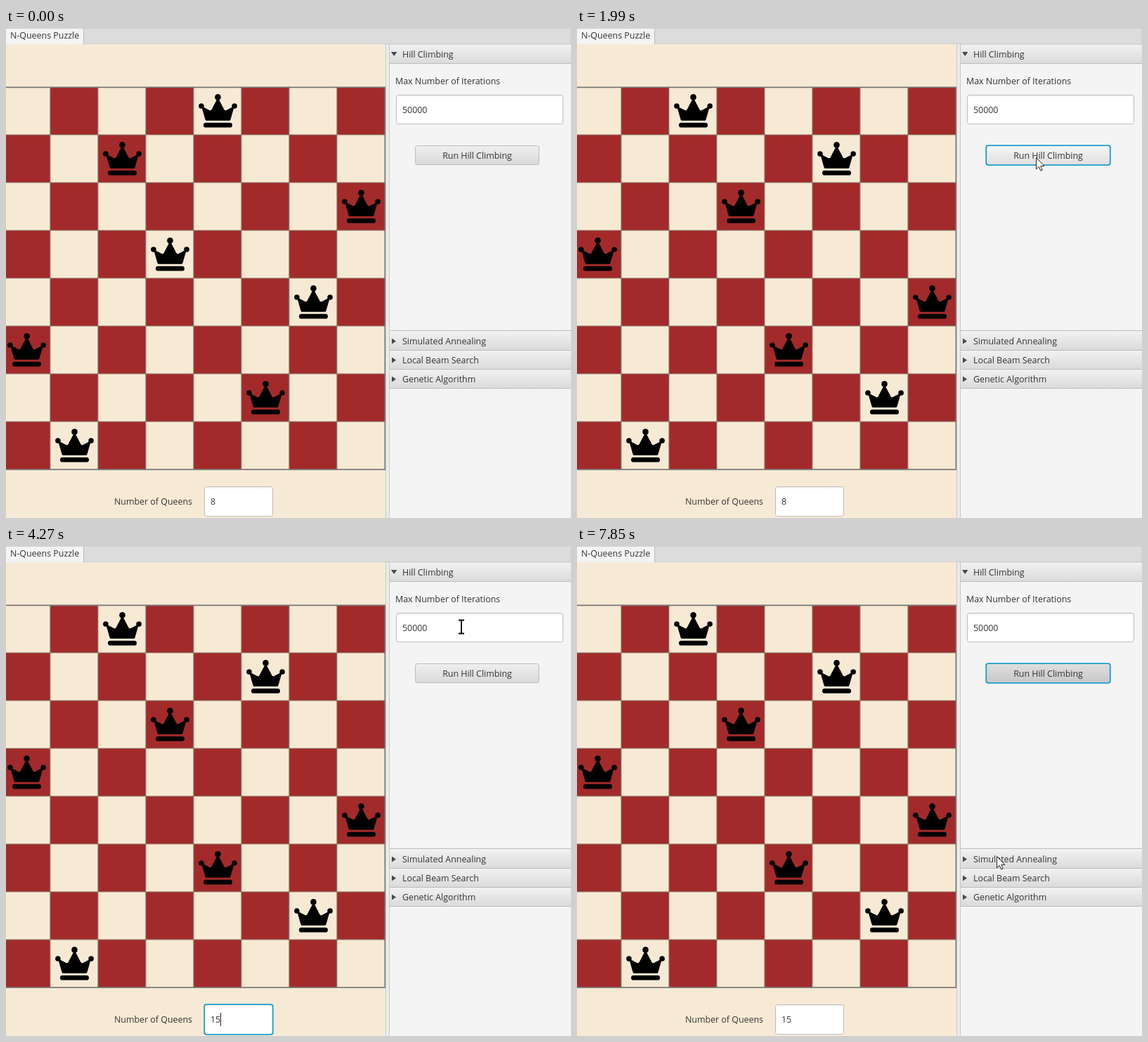
Write an HTML page that moves like this. It is 804 px wide and 697 px high and loops after 8 s.

```html
<!DOCTYPE html>
<html lang="en">
<head>
<meta charset="utf-8">
<title>N-Queens Puzzle</title>
<style>
  html, body { margin: 0; width: 100%; height: 100%; overflow: hidden; background: #f4f4f4; }
  svg { display: block; width: 100%; height: 100%; }
  text { font: 12.42px "Open Sans", "Noto Sans", sans-serif; fill: #333; white-space: pre; }
</style>
</head>
<body>
<svg viewBox="0 0 804 697" xmlns="http://www.w3.org/2000/svg">
  <defs id="defs">
    <g id="queen">
      <circle cx="27.5" cy="4.4" r="4.3"/>
      <circle cx="3.9" cy="17" r="3.8"/>
      <circle cx="51.1" cy="17" r="3.8"/>
      <path d="M4 17L15.5 23Q17.5 24 18.6 22L27.5 5L36.4 22Q37.5 24 39.5 23L51 17L45.5 36.2Q45 37.8 43.5 37.8H11.5Q10 37.8 9.5 36.2Z"/>
      <rect x="7" y="40.8" width="41" height="6.8" rx="3.4"/>
    </g>
  </defs>
  <g id="scene"></g>
  <path id="arrow" d="M.5 .5V16.8L4.2 13.3L6.8 19L9.2 18L6.7 12.4H11.8Z" fill="#fff" stroke="#222"/>
  <path id="beam" d="M-4 -9.5H4M0 -9.5V9.5M-4 9.5H4" stroke="#000" stroke-width="1.8"/>
</svg>
<script>
const LOOP = 8000, SIZE = 8, CELL = 68, LEFT = -5, TOP = 84;
const LIGHT = '#f7ead5', DARK = '#a32a2a', LINE = '#bcbcbc';
const $ = id => document.getElementById(id);
const range = n => [...Array(n).keys()];

function set(el, attrs) {
  for (const key in attrs) el.setAttribute(key, attrs[key]);
}
function add(tag, attrs, parent = $('scene')) {
  const el = document.createElementNS('http://www.w3.org/2000/svg', tag);
  set(el, attrs);
  return parent.appendChild(el);
}
const rect = (x, y, width, height, fill, more) => add('rect', { x, y, width, height, fill, ...more });
const show = (el, on) => set(el, { visibility: on ? 'visible' : 'hidden' });

function label(x, y, str, more) {
  const el = add('text', { x, y, ...more });
  el.textContent = str;
  return el;
}

function gradient(id, from, to, end = 1) {
  const g = add('linearGradient', { id, x2: 0, y2: 1 }, $('defs'));
  add('stop', { 'stop-color': from }, g);
  add('stop', { 'stop-color': to, offset: end }, g);
}

// Box with a border and a blue focus ring
function control(x, y, w, h, look) {
  const body = rect(x + .5, y + .5, w, h, `url(#${look})`, { rx: 3, stroke: LINE });
  const ring = rect(x + .2, y + .2, w + .6, h + .6, 'none', { rx: 3, stroke: '#1a9fcd', 'stroke-width': 1.8 });
  const inside = (px, py) => px >= x && px <= x + w && py >= y && py <= y + h;
  return { body, ring, inside };
}

function titleBar(y, str, open) {
  rect(546, y, 258, 27, 'url(#title)');
  rect(546, y + 26, 258, 1, LINE);
  add('path', { d: open ? `M548 ${y + 10}h8.4l-4.2 6z` : `M549 ${y + 9.5}v8l6 -4z`, fill: '#484848' });
  label(564, y + 18, str);
}

gradient('title', '#f1f1f1', '#dadada');
gradient('normal', '#efefef', '#d9d9d9');
gradient('hover', '#f6f6f6', '#dfdfdf');
gradient('pressed', '#dfdfdf', '#c8c8c8');
gradient('field', '#f0f0f0', '#fff', .1);

// Header and tab
rect(0, 0, 804, 697, '#f4f4f4');
rect(0, 0, 804, 23, '#dcdcdc', { stroke: '#c4c4c4' });
rect(0, 1, 110, 22, '#f4f4f4');
rect(110, 1, 1, 22, LINE);
label(6, 15, 'N-Queens Puzzle');

// Board
rect(0, 23, 540, 674, LIGHT);
for (const r of range(SIZE)) for (const c of range(SIZE))
  rect(LEFT + c * CELL, TOP + r * CELL, CELL, CELL, (r + c) % 2 ? DARK : LIGHT,
    { stroke: '#8c8074', 'stroke-width': .8 });
add('path', { d: 'M0 84.5H539.5V628H0', fill: 'none', stroke: '#777', 'stroke-width': 1.4 });
const queens = range(SIZE).map(() => add('use', { href: '#queen' }));
label(154, 678, 'Number of Queens');

// Side panel
rect(540.5, 22.5, 5, 680, '#ececec', { stroke: '#c6c6c6' });
titleBar(24, 'Hill Climbing', true);
rect(546, 430, 258, 1, LINE);
['Simulated Annealing', 'Local Beam Search', 'Genetic Algorithm'].forEach((s, i) => titleBar(432 + 27 * i, s));
label(554, 79.5, 'Max Number of Iterations');

const limit = control(555, 95, 237, 41, 'field');
label(564, 121, '50000');
const run = control(582, 167, 176, 27, 'normal');
label(670.5, 186, 'Run Hill Climbing', { 'text-anchor': 'middle' });
const count = control(282, 652, 97, 42, 'field');
const mark = rect(290, 664, 8, 19, '#0096c9');
const countText = label(291, 678, '');
const caret = rect(0, 0, 1, 19, '#222');

// Each click on the button: press, release, the queen's column per row after it
const FIRST = '42736051';
const clicks = [
  [600, 680, '31640752'], [830, 990, '73025164'], [1060, 1210, '17502463'],
  [1390, 1490, '52064713'], [1910, 1990, '25307461'], [4740, LOOP, ''],
];

// Pointer moves: begin, end, and the point reached
const ENTRY = [625, 690];
const moves = [
  [40, 320, 648, 140], [320, 370, 653, 184], [2150, 2640, 640, 442],
  [2830, 3010, 377, 637], [3110, 3330, 305, 674], [3360, 3690, 217, 676],
  [3950, 4270, 648, 115], [4420, 4740, 639, 192], [5180, 5600, 620, 390],
  [5800, 6070, 611, 406], [6400, 6590, 613, 397], [6690, 6950, 626, 251],
  [6950, 7440, 597, 441],
];
const FIELD_CLICK = 3330, DRAG_END = 3690, FIELD_LEFT = 4420, LAST_RUN = 4740;

const between = (t, a, b) => t >= a && t < b;
const ease = k => k * k * (3 - 2 * k);
const progress = (t, a, b) => ease(Math.min(1, Math.max(0, (t - a) / (b - a))));

const pointer = t => moves.reduce(([x, y], [a, b, toX, toY]) => {
  const k = progress(t, a, b);
  return [x + (toX - x) * k, y + (toY - y) * k];
}, ENTRY);

function focused(t) {
  if (t < clicks[0][0]) return null;
  if (between(t, FIELD_CLICK, FIELD_LEFT)) return count;
  return between(t, FIELD_LEFT, LAST_RUN) ? limit : run;
}

function draw(t) {
  const columns = clicks.reduce((now, [, release, next]) => t >= release ? next : now, FIRST);
  queens.forEach((q, r) => set(q, { x: LEFT + 7 + columns[r] * CELL, y: TOP + 10 + r * CELL }));

  const [x, y] = pointer(t);
  const onText = between(t, FIELD_CLICK, DRAG_END) || limit.inside(x, y) || count.inside(x, y);
  for (const id of ['arrow', 'beam']) {
    set($(id), { transform: `translate(${Math.round(x)} ${Math.round(y)})` });
    show($(id), t >= moves[0][0] && onText === (id === 'beam'));
  }

  const pressed = clicks.some(([a, b]) => between(t, a, b));
  const look = pressed ? 'pressed' : run.inside(x, y) ? 'hover' : 'normal';
  set(run.body, { fill: `url(#${look})` });

  const focus = focused(t);
  for (const box of [limit, run, count]) show(box.ring, box === focus);

  const value = t < 3840 ? '8' : t < 3990 ? '1' : '15';
  const selected = between(t, 3420, 3840);
  countText.textContent = value;
  countText.style.fill = selected ? '#fff' : '';
  show(mark, selected);
  set(caret, focus === limit ? { x: 600, y: 107 } : { x: 291 + 7 * value.length, y: 664 });
  show(caret, !selected && (focus === limit || focus === count));
}

const start = performance.now();
function frame() {
  draw((performance.now() - start) % LOOP);
  requestAnimationFrame(frame);
}
frame();
</script>
</body>
</html>
```
